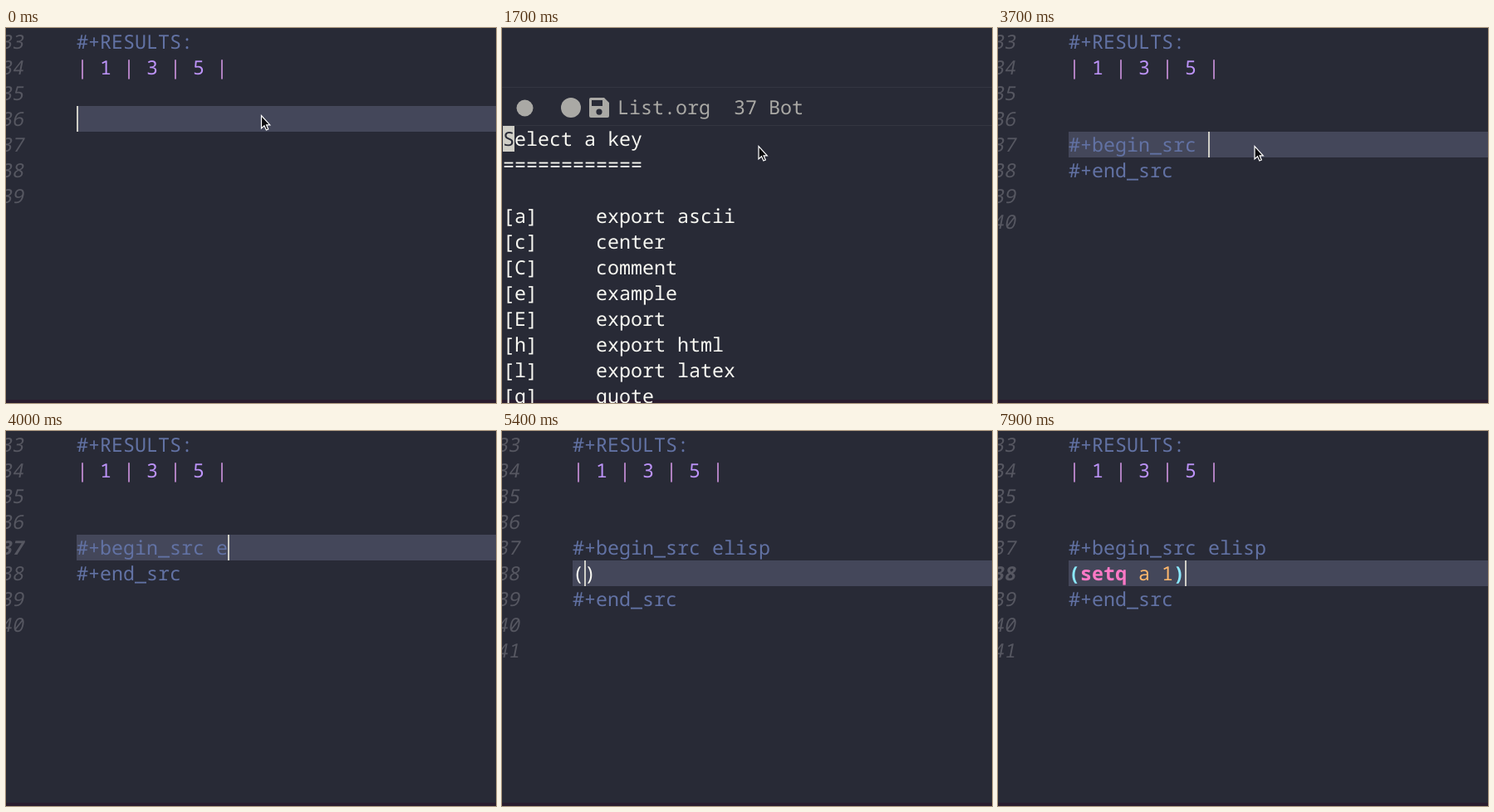
Animation of 590x452 px, one loop 8 s. Source, as an HTML page:

```html
<!DOCTYPE html>
<html lang="en">
<head>
<meta charset="utf-8">
<title>Org source block</title>
<style>
  html, body { margin: 0; width: 100%; height: 100%; overflow: hidden; background: #282a36; }
  svg { display: block; width: 590px; height: 452px; }
  text { white-space: pre; text-rendering: geometricPrecision; fill: #f8f8f2; font-variant-ligatures: none; }
  .meta { fill: #6272a4; }
  .bar { fill: #c78fd8; }
  .cell { fill: #bd93f9; }
  .num { fill: #565761; }
  .key { fill: #ff79c6; font-weight: 700; }
  .val { fill: #ffb86c; }
  .match { fill: #8be9fd; font-weight: 700; }
  .bold { font-weight: 700; }
  .mode { fill: #aaa9a5; }
  .dark { fill: #282a36; }
  .caret { fill: #cfcec6; }
  .line { fill: #44475a; }
  .rule { fill: #343641; }
</style>
</head>
<body>
<svg viewBox="0 0 590 452">
  <rect width="590" height="452" fill="#282a36"/>
  <rect y="448" width="590" height="4" fill="#2a1d2f"/>
  <g id="screen"></g>
  <path id="mouse" d="M.5 .5V16L4 12.8L6.4 18L8.8 17L6.6 11.8H10.8Z" fill="#0b0b0e" stroke="#fff" stroke-width="1.2"/>
</svg>
<script>
const LOOP = 8000, CELL = 14, ROW = 31, LEFT = 85;
const screen = document.getElementById('screen');
const mouse = document.getElementById('mouse');

// Choose the face whose capitals sit nearest 15.3px tall in a 14px cell.
function pickFont() {
  const ctx = document.createElement('canvas').getContext('2d');
  const fonts = ['"Noto Sans Mono CJK JP"', '"Noto Sans Mono"'].map(name => {
    const family = name + ', "Noto Sans Mono", monospace';
    ctx.font = '100px ' + family;
    const m = ctx.measureText('E');
    const size = CELL / m.width * 100;
    return { family, size, miss: Math.abs(m.actualBoundingBoxAscent * size / 100 - 15.3) };
  });
  return fonts.sort((a, b) => a.miss - b.miss)[0];
}
const font = pickFont();
screen.style.fontFamily = font.family;
screen.style.fontSize = font.size + 'px';

const rect = (x, y, w, h, cls) =>
  `<rect x="${x}" y="${y}" width="${w}" height="${h}" class="${cls}"/>`;
const text = (x, y, body, cls = '') => `<text x="${x}" y="${y}" class="${cls}">${body}</text>`;
const span = (cls, body) => `<tspan class="${cls}">${body}</tspan>`;

const setq = span('key', 'setq');
const a = span('val', 'a');
const one = span('val', '1');

// Each step changes only the named parts of the editor's state.
const steps = [
  [0, { menu: false, row: 3, col: 0, caret: true, last: 39, head: '', code: null, bold: 0, pointer: true }],
  [600, { row: 4 }],
  [1400, { caret: false }],
  [1700, { menu: true, caret: true }],
  [2200, { caret: false }],
  [2700, { caret: true }],
  [2900, { menu: false, head: '#+begin_src ', col: 12, last: 40 }],
  [3200, { caret: false }],
  [3700, { caret: true }],
  [4000, { head: '#+begin_src e', col: 13, bold: 37, pointer: false }],
  [4100, { head: '#+begin_src el', col: 14 }],
  [4300, { head: '#+begin_src eli', col: 15 }],
  [4400, { head: '#+begin_src elis', col: 16 }],
  [4500, { head: '#+begin_src elisp', col: 17, bold: 0 }],
  [4800, { code: '', row: 5, col: 0, last: 41 }],
  [5300, { caret: false }],
  [5400, { code: '()', col: 1, caret: true }],
  [5600, { code: '(s)', col: 2, bold: 38 }],
  [5800, { code: '(se)', col: 3 }],
  [5900, { code: '(set)', col: 4 }],
  [6000, { code: `(${setq} )`, col: 6, bold: 0 }],
  [6500, { caret: false }],
  [6800, { code: `(${setq} ${a})`, col: 7, caret: true }],
  [6900, { code: `(${setq} ${a} )`, col: 8 }],
  [7200, { code: `(${setq} ${a} 1)`, col: 9 }],
  [7400, { code: `(${setq} ${a} ${one})` }],
  [7800, { col: 10, bold: 38 }],
  [7900, { code: span('match', '(') + `${setq} ${a} ${one}` + span('match', ')') }]
];
let state = {};
const states = steps.map(([at, change]) => (state = { ...state, ...change, at }));

function drawOrg(s) {
  const base = row => 25 + ROW * row;
  const top = 1 + ROW * s.row;
  let out = rect(LEFT, top, 505, ROW, 'line');
  for (let n = 33; n <= s.last; n++) {
    const weight = n === s.bold ? ' bold' : '';
    out += `<g transform="translate(-7 ${base(n - 33)}) skewX(-11)">${text(0, 0, n, 'num' + weight)}</g>`;
  }
  const bar = span('bar', '|');
  const table = bar + [1, 3, 5].map(n => span('cell', ` ${n} `) + bar).join('');
  out += text(LEFT, base(0), '#+RESULTS:', 'meta') + text(LEFT, base(1), table);
  if (s.head) {
    const open = s.code !== null;
    out += text(LEFT, base(4), s.head, 'meta');
    if (open) out += text(LEFT, base(5), s.code);
    out += text(LEFT, base(open ? 6 : 5), '#+end_src', 'meta');
  }
  if (s.caret) out += rect(LEFT + CELL * s.col, top, 2, ROW, 'caret');
  return out;
}

const choices = ['a export ascii', 'c center', 'C comment', 'e example', 'E export',
  'h export html', 'l export latex', 'q quote'];

function drawMenu(s) {
  let out = rect(0, 71, 590, 1, 'rule') + rect(0, 117, 590, 1, 'rule');
  out += '<circle cx="27.5" cy="96.5" r="10" class="mode"/><circle cx="83" cy="96" r="12" class="mode"/>';
  // Disk icon with its shutter and hub cut out
  out += '<path class="mode" fill-rule="evenodd" d="M107 84H123L129 90V106Q129 108 127 108H107Q105 108 105 106V86Q105 84 107 84Z' +
    'M108 87V94H121V87ZM117 97.5A3.6 3.6 0 1 0 117 104.7A3.6 3.6 0 1 0 117 97.5Z"/>';
  out += text(139, 104, 'List.org  37 Bot', 'mode');
  if (s.caret) out += rect(1, 118, CELL, ROW, 'caret');
  out += text(1, 142, (s.caret ? span('dark', 'S') : 'S') + 'elect a key');
  out += text(1, 142 + ROW, '='.repeat(12));
  choices.forEach((c, i) => {
    out += text(1, 142 + ROW * (i + 3), `[${c[0]}]     ${c.slice(2)}`);
  });
  return out;
}

let shown = null;
function frame(now) {
  const t = now % LOOP;
  const s = states.findLast(x => x.at <= t);
  if (s !== shown) {
    screen.innerHTML = s.menu ? drawMenu(s) : drawOrg(s);
    mouse.style.display = s.pointer ? '' : 'none';
    shown = s;
  }
  const p = Math.min(4, Math.max(0, Math.floor(t / 100) - 1)) / 4;
  mouse.setAttribute('transform', `translate(${307 + 1.5 * p} ${105 + 37 * p})`);
}

const start = performance.now();
function tick() {
  frame(performance.now() - start);
  requestAnimationFrame(tick);
}
tick();
</script>
</body>
</html>
```
